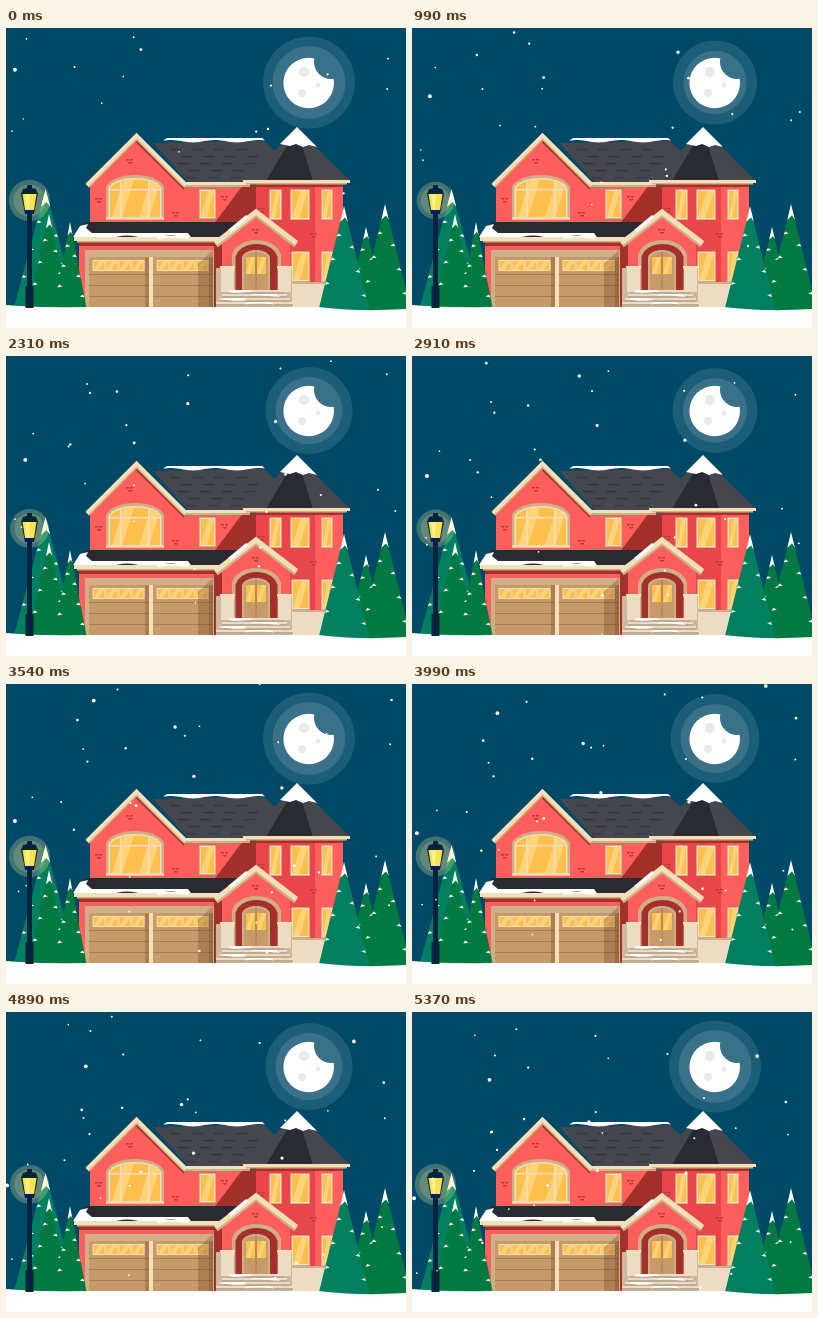
Write an HTML page with a canvas that moves like this. It is 400 by 300 pixels and loops after 5400 ms.

```html
<!DOCTYPE html>
<html lang="en">
<head>
<meta charset="utf-8">
<title>Snowy night</title>
<style>
html, body { margin: 0; width: 100%; height: 100%; overflow: hidden; background: #004967; }
canvas { display: block; width: 400px; height: 300px; }
</style>
</head>
<body>
<canvas id="stage" width="400" height="300"></canvas>
<script>
const stage = document.getElementById('stage');
const ctx = stage.getContext('2d');
const LOOP = 5400, PULSE = 1800, FLAKES = 44;
const C = {
  sky: '#004967', white: '#ffffff', red: '#ff5f5c', deep: '#e8464a', shade: '#a3302b', brick: '#b83a38',
  roof: '#46464f', roofDark: '#2a2a32', tile: '#33333b', trim: '#f5dfb9', trimDark: '#cfae88',
  stone: '#ecdcc4', glass: '#ffbf4d', shine: '#ffd37a', wood: '#c69a6b', woodDark: '#a67c52',
  iron: '#04233f', green: '#007a40', teal: '#00805f'
};

function rect(g, x, y, w, h, color) {
  g.fillStyle = color;
  g.fillRect(x, y, w, h);
}
function poly(g, color, ...p) {
  g.fillStyle = color;
  g.beginPath();
  for (let i = 0; i < p.length; i += 2) g.lineTo(p[i], p[i + 1]);
  g.fill();
}
function disc(g, x, y, r, color) {
  g.fillStyle = color;
  g.beginPath();
  g.arc(x, y, r, 0, Math.PI * 2);
  g.fill();
}
function chevron(g, color, width, x, y, half, drop) {
  g.strokeStyle = color;
  g.lineWidth = width;
  g.beginPath();
  g.moveTo(x - half, y + drop);
  g.lineTo(x, y);
  g.lineTo(x + half, y + drop);
  g.stroke();
}
function seeded(seed) {
  return () => (seed = (seed * 16807) % 2147483647) / 2147483647;
}

function glint(g, x, y, w, h) {
  g.save();
  g.beginPath();
  g.rect(x, y, w, h);
  g.clip();
  poly(g, C.shine, x + w * .55, y, x + w, y, x + w * .45, y + h, x, y + h);
  g.restore();
}
function pane(g, x, y, w, h) {
  rect(g, x - 1.5, y - 1.5, w + 3, h + 3, C.trim);
  rect(g, x, y, w, h, C.glass);
  glint(g, x, y, w, h);
  rect(g, x - 2, y + h + 1, w + 4, 1, C.trimDark);
}
function bricks(g, x, y) {
  rect(g, x, y, 3, 1.5, C.brick);
  rect(g, x + 4, y, 3, 1.5, C.brick);
  rect(g, x + 2, y + 3, 4, 1.5, C.brick);
}
function archPath(g, x, y, w, h, rise) {
  g.beginPath();
  g.moveTo(x, y + h);
  g.lineTo(x, y + rise);
  g.bezierCurveTo(x + w * .12, y - rise * .33, x + w * .88, y - rise * .33, x + w, y + rise);
  g.lineTo(x + w, y + h);
}
function arch(g, x, y, w, h, rise, color) {
  archPath(g, x, y, w, h, rise);
  g.fillStyle = color;
  g.fill();
}
// a flat-topped strip of snow with a wavy lower edge
function drift(g, x0, x1, top, depth) {
  g.fillStyle = C.white;
  g.beginPath();
  g.moveTo(x1 - 4, top);
  g.lineTo(x0 + 4, top);
  for (let x = x0; x <= x1; x += 2) g.lineTo(x, top + depth * (.8 + .3 * Math.sin(x / 7)));
  g.fill();
}

function tree(g, x, top, half, bottom, color) {
  const h = bottom - top;
  poly(g, color, x, top, x + half, bottom, x - half, bottom);
  poly(g, C.white, x, top - 1, x + half * .15, top + h * .14, x + 1, top + h * .1, x - half * .14, top + h * .14);
  for (let i = 0; i < 6; i++) {
    const k = .28 + i * .115, side = i % 2 ? 1 : -1;
    const ex = x + side * half * k, y = top + h * k;
    poly(g, C.white, ex, y, ex - side * 5, y - 1, ex - side * 1.5, y - 3);
  }
}

function leftGable(g) {
  poly(g, C.red, 130.5, 109, 178, 156, 178, 200, 84, 200, 84, 156);
  poly(g, C.shade, 130.5, 109, 178, 156, 178, 162, 130.5, 115);
  arch(g, 100, 147, 58, 45, 12, C.trimDark);
  arch(g, 102.5, 150, 53, 41, 10, C.trim);
  g.save();
  archPath(g, 104, 151.5, 50, 37.5, 9);
  g.clip();
  rect(g, 104, 148, 50, 42, C.glass);
  for (const x of [119, 146]) poly(g, C.shine, x, 148, x + 10, 148, x - 3, 190, x - 13, 190);
  rect(g, 104, 161, 50, 1.5, C.trim);
  for (const x of [114, 142]) rect(g, x, 148, 1.5, 42, C.trim);
  g.restore();
  rect(g, 100, 189, 58, 2.5, C.trim);
  bricks(g, 120, 131);
  bricks(g, 89, 170);
  bricks(g, 166, 184);
  chevron(g, C.trimDark, 5, 130.5, 109, 49, 49);
  chevron(g, C.trim, 4, 130.5, 107.5, 49.5, 49.5);
}

function middle(g) {
  rect(g, 177, 157, 75, 44, C.red);
  poly(g, C.shade, 237, 157, 252, 157, 252, 201, 204, 201);
  poly(g, C.roof, 147, 115, 258, 113, 274, 128, 262, 156, 184, 156);
  for (let row = 0; row < 5; row++)
    for (let i = 0; i < 4; i++)
      rect(g, 164 + row * 4 + i * 22 + (row % 2) * 7, 121 + row * 7, 11, 1.2, C.tile);
  drift(g, 157, 260, 110, 4);
  rect(g, 178, 154, 66, 3.5, C.trim);
  rect(g, 178, 157.5, 66, 1.5, C.trimDark);
  pane(g, 195, 163, 13, 26);
  bricks(g, 215, 168);
}

function turret(g) {
  rect(g, 250, 155, 59, 124, C.deep);
  rect(g, 309, 155, 28, 106, C.red);
  rect(g, 250, 156, 87, 3, C.shade);
  poly(g, C.roof, 291, 101, 344, 153, 237, 153);
  poly(g, C.roofDark, 291, 101, 307, 153, 260, 153);
  poly(g, C.white, 291, 99, 311, 119, 303, 117, 297, 119, 290, 116, 284, 118, 274, 116);
  rect(g, 237, 152, 107, 3, C.trim);
  rect(g, 240, 155, 101, 1.5, C.trimDark);
  for (const [x, w] of [[265, 9], [286, 16], [317, 8]]) pane(g, x, 163, w, 27);
  for (const [x, w] of [[287, 15], [317, 8]]) pane(g, x, 225, w, 27);
  bricks(g, 252, 180);
  bricks(g, 304, 205);
  rect(g, 284, 254, 53, 26, C.stone);
  rect(g, 284, 254, 53, 2, C.trimDark);
}

function garage(g) {
  rect(g, 73, 209, 143, 70, C.red);
  rect(g, 73, 214, 143, 4, C.shade);
  rect(g, 79, 222, 131, 57, C.trimDark);
  rect(g, 143, 229, 4, 50, C.trim);
  rect(g, 208, 216, 8, 63, C.shade);
  for (const x of [83, 147]) {
    rect(g, x, 229, 60, 50, C.wood);
    for (let y = 246; y < 279; y += 11) rect(g, x, y, 60, 1, C.woodDark);
    for (let i = 0; i < 4; i++) {
      const px = x + 4.5 + i * 13;
      rect(g, px - 1, 232, 13, 11, C.trim);
      rect(g, px, 233, 11, 9, C.glass);
      glint(g, px, 233, 11, 9);
    }
    rect(g, x + 56, 229, 4, 50, 'rgba(110,65,30,.3)');
  }
  poly(g, 'rgba(110,65,30,.3)', 207, 222, 192, 236, 192, 279, 207, 279);
  poly(g, C.roofDark, 79, 194, 231, 194, 221, 209, 67, 209);
  poly(g, C.white, 67, 209, 74, 198, 82, 196, 80, 200, 86, 205, 100, 209);
  drift(g, 70, 186, 205, 5);
  rect(g, 68, 209, 148, 4, C.trim);
  rect(g, 71, 213, 145, 1.5, C.trimDark);
  drift(g, 150, 184, 208, 3);
}

function steps(g) {
  for (let i = 0; i < 4; i++) {
    const x = 219 - i * 3, y = 262 + i * 4, w = 59 + i * 6;
    rect(g, x, y, w, 4, C.stone);
    rect(g, x, y + 2, w, 2, '#bda994');
    drift(g, x + 2 + i % 2 * 26, x + 28 + i % 2 * 30, y, 2.5);
  }
}

function porch(g) {
  rect(g, 210, 240, 76, 39, '#cdb79e');
  poly(g, C.red, 250, 186, 284, 215, 284, 264, 216, 264, 216, 215);
  arch(g, 226, 212, 49, 51, 15, C.trimDark);
  arch(g, 229.5, 216, 42, 47, 13, C.shade);
  arch(g, 236, 222, 28, 41, 7, C.trimDark);
  arch(g, 238, 224, 24, 39, 6, C.wood);
  for (const x of [240, 251]) {
    rect(g, x, 229, 9, 17, C.glass);
    glint(g, x, 229, 9, 17);
  }
  rect(g, 249.5, 223, 1, 40, C.woodDark);
  for (const x of [215, 272]) {
    rect(g, x, 240, 13, 24, C.stone);
    rect(g, x - 1, 238, 15, 2.5, C.trim);
  }
  bricks(g, 246, 201);
  chevron(g, C.trimDark, 6, 250, 186, 40, 31);
  chevron(g, C.trim, 5, 250, 184, 40.5, 31);
  poly(g, C.white, 222, 202, 240, 187, 242, 189, 230, 200, 225, 204);
  steps(g);
}

function lamp(g) {
  rect(g, 21, 184, 5, 96, C.iron);
  rect(g, 19.5, 258, 8, 22, C.iron);
  poly(g, C.iron, 15, 165, 32, 165, 28, 186, 19, 186);
  poly(g, '#ffe04f', 16.5, 166, 30.5, 166, 28, 182, 19, 182);
  poly(g, '#fff08a', 19, 166, 24, 166, 23, 182, 21, 182);
  poly(g, C.iron, 15, 166, 17, 161, 21, 160, 21, 157, 26, 157, 26, 160, 30, 161, 32, 166);
}

function layer(paint) {
  const c = document.createElement('canvas');
  c.width = 400;
  c.height = 300;
  paint(c.getContext('2d'));
  return c;
}

function scenery(g) {
  tree(g, 39.5, 162, 32, 281, C.teal);
  middle(g);
  leftGable(g);
  turret(g);
  garage(g);
  porch(g);
  tree(g, 360, 200, 20, 282, C.green);
  tree(g, 379, 177, 26, 282, C.green);
  tree(g, 338, 179, 26, 284, C.teal);
  tree(g, 43, 187, 22, 282, C.green);
  tree(g, 64, 195, 17, 282, C.green);
  g.fillStyle = C.white;
  g.beginPath();
  g.moveTo(0, 277);
  g.quadraticCurveTo(35, 280, 76, 279);
  g.lineTo(312, 279);
  g.quadraticCurveTo(350, 284, 400, 281);
  g.lineTo(400, 300);
  g.lineTo(0, 300);
  g.fill();
}

function moon(glow) {
  disc(ctx, 303, 54.5, 42 + 4 * glow, 'rgba(255,255,255,.11)');
  disc(ctx, 303, 54.5, 31.5 + 5 * glow, 'rgba(255,255,255,.12)');
  ctx.save();
  ctx.beginPath();
  ctx.rect(270, 20, 70, 70);
  ctx.arc(325, 34, 17, 0, Math.PI * 2);
  ctx.clip('evenodd');
  disc(ctx, 302.7, 55, 25.3, C.white);
  disc(ctx, 298, 44, 5, '#e9e9ec');
  disc(ctx, 296, 65, 4, '#e9e9ec');
  disc(ctx, 312, 57, 2.5, '#e9e9ec');
  ctx.restore();
}

// each flake enters at the top at its own time, so the snow thickens
const rand = seeded(2024);
const flakes = Array.from({ length: FLAKES }, (_, i) => ({
  x: 4 + rand() * 385,
  born: -3.5 + 8.6 * i / FLAKES,
  speed: 22 + rand() * 32,
  sway: 3 + rand() * 7,
  phase: rand() * 6.28,
  r: .8 + rand() * rand() * 1.5
}));

function snow(sec) {
  for (const f of flakes) {
    const age = sec - f.born;
    if (age > 0) disc(ctx, f.x + f.sway * Math.sin(age + f.phase), f.speed * age, f.r, C.white);
  }
}

const scene = layer(scenery), post = layer(lamp);

function draw(now) {
  const t = now % LOOP;
  const glow = .5 + .5 * Math.cos(t / PULSE * Math.PI * 2);
  rect(ctx, 0, 0, 400, 300, C.sky);
  moon(glow);
  ctx.drawImage(scene, 0, 0);
  disc(ctx, 23.5, 172.5, 18.7 + 2 * glow, 'rgba(255,240,150,.25)');
  disc(ctx, 23.5, 172.5, 14.5 + 1.5 * glow, 'rgba(255,240,150,.18)');
  ctx.drawImage(post, 0, 0);
  snow(t / 1000);
}

const start = performance.now();
function tick() {
  draw(performance.now() - start);
  requestAnimationFrame(tick);
}
tick();
</script>
</body>
</html>
```
